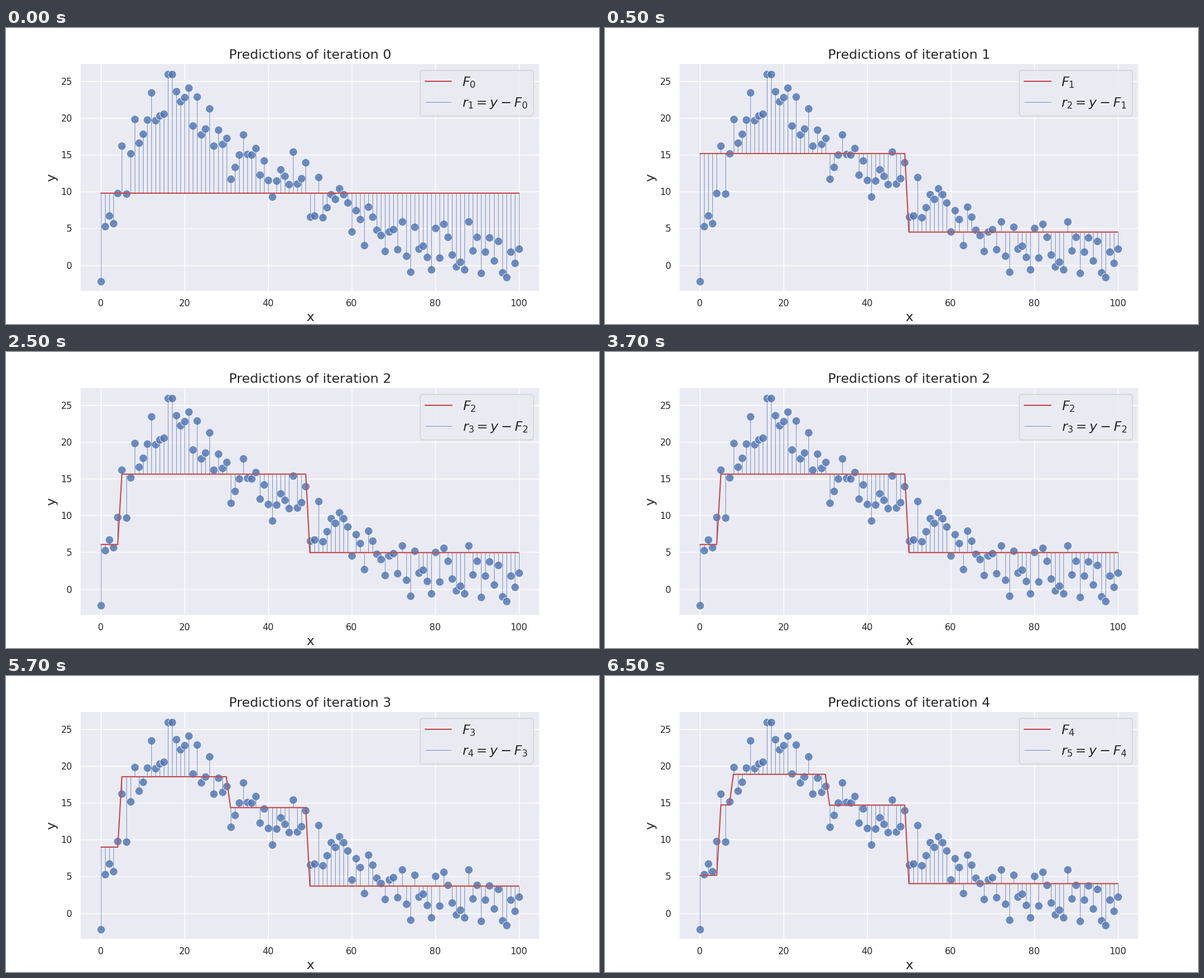
These frames come from a looping animation (1000 px wide and 500 px high, 8000 ms). A matplotlib script:

```python
import numpy as np
import matplotlib.pyplot as plt
from matplotlib.animation import FuncAnimation

BLUE, RED, PANEL, INK = "#4c72b0", "#c44e52", "#eaeaf2", "0.15"
RATE = 0.9
ROUNDS = 4
SCALE = 17

plt.rcParams.update({
    "font.family": "DejaVu Sans",
    "font.size": 12,
    "text.color": INK,
    "axes.labelcolor": INK,
    "axes.facecolor": PANEL,
    "axes.edgecolor": "white",
    "axes.linewidth": 1.25,
    "axes.axisbelow": True,
    "axes.grid": True,
    "axes.titlesize": 16,
    "axes.labelsize": 16,
    "grid.color": "white",
    "grid.linewidth": 1,
    "xtick.color": INK,
    "ytick.color": INK,
    "xtick.labelsize": 11,
    "ytick.labelsize": 11,
    "xtick.major.size": 6,
    "ytick.major.size": 6,
    "xtick.bottom": False,
    "ytick.left": False,
    "lines.solid_capstyle": "round",
})

# Gamma-shaped trend with Gaussian noise
np.random.seed(123)
x = np.arange(101)
y = 1000 * x / SCALE**2 * np.exp(-x / SCALE) + np.random.normal(0, 2, len(x))


def fit_stump(res):
    """Two-level fit with the smallest squared error."""
    def split(cut):
        return np.where(x < cut, res[:cut].mean(), res[cut:].mean())

    return min((split(cut) for cut in x[1:]),
               key=lambda s: ((res - s) ** 2).sum())


def boost():
    """Predictions after each stump, starting from the mean."""
    steps = [np.full(len(y), y.mean())]
    for _ in range(ROUNDS):
        steps.append(steps[-1] + RATE * fit_stump(y - steps[-1]))
    return steps


preds = boost()

fig, ax = plt.subplots(figsize=(10, 5), dpi=100)
ax.scatter(x, y, s=100, color=BLUE, alpha=0.8, edgecolors="white",
           linewidths=0.8)
stems = ax.vlines(x, preds[0], y, color=BLUE, lw=0.5)
line, = ax.plot(x, preds[0], color=RED, lw=1.5)
pad = 0.05 * np.ptp(y)
ax.set(xlim=(-5, 105), ylim=(y.min() - pad, y.max() + pad),
       xlabel="x", ylabel="y")
title = ax.set_title("")


def update(i):
    n = (i + 3) // 4
    f = preds[n]
    line.set_ydata(f)
    stems.set_segments([[(a, b), (a, c)] for a, b, c in zip(x, f, y)])
    title.set_text(f"Predictions of iteration {n}")
    labels = [f"$F_{n}$", f"$r_{n + 1} = y - F_{n}$"]
    ax.legend([line, stems], labels, loc="upper right", fontsize=16)
    return []


anim = FuncAnimation(fig, update, frames=16, interval=500, repeat=True,
                     repeat_delay=0, blit=False)
plt.show()
```
